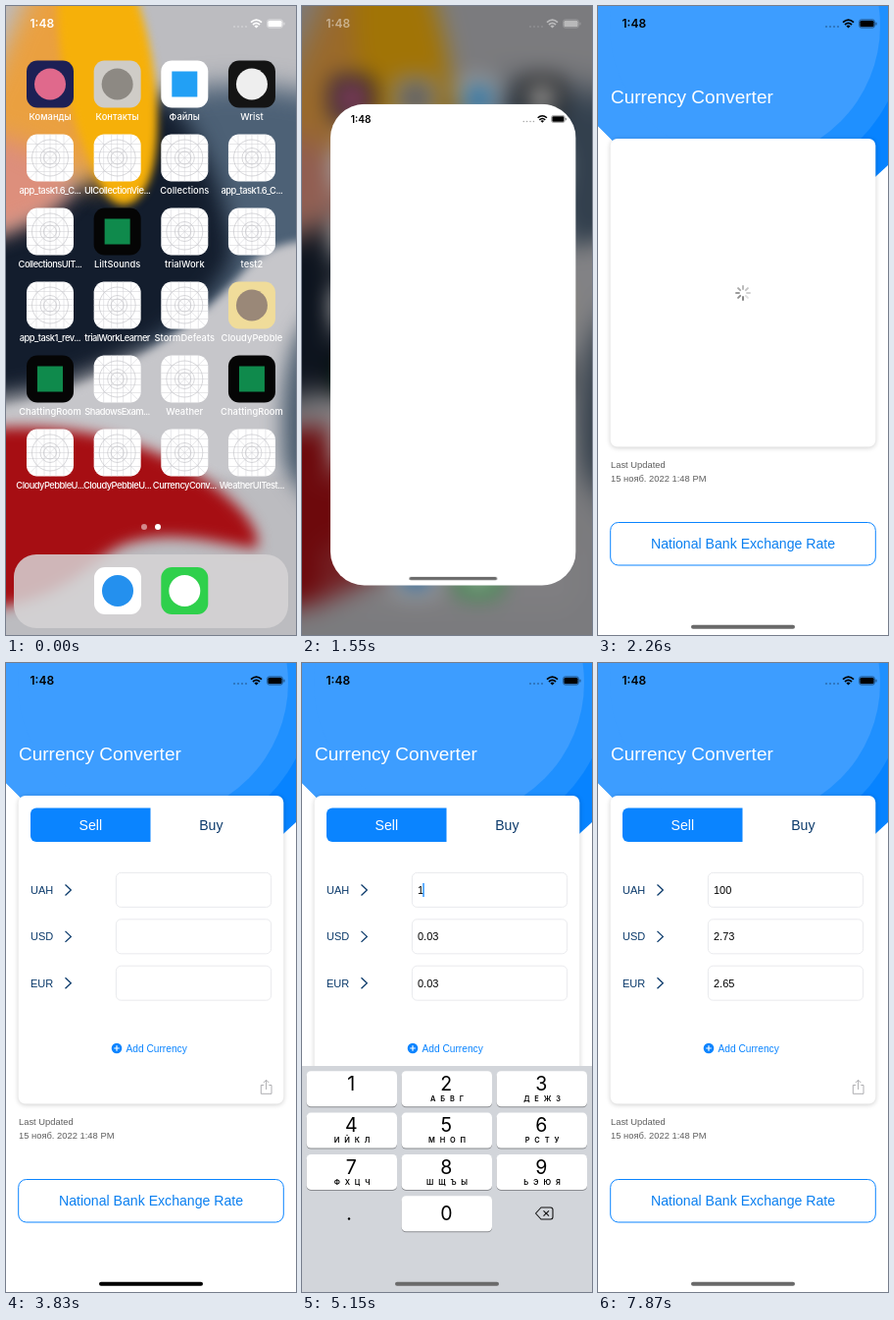
Recreate the animation shown at these times as an HTML page. Size 296 by 640 pixels, loop 8000 ms.

```html
<!DOCTYPE html>
<html lang="en">
<head>
<meta charset="utf-8">
<title>Currency Converter</title>
<style>
  html, body { margin: 0; width: 100%; height: 100%; overflow: hidden; background: #000; }
  svg { display: block; width: 296px; height: 640px; }
  text { font-family: "Liberation Sans", Arial, sans-serif; white-space: pre; }
  .sf { font-family: Inter, sans-serif; }
  .mid { text-anchor: middle; }
</style>
</head>
<body>
<svg id="stage" viewBox="0 0 296 640"></svg>
<script>
const BLUE = '#0a84ff', NAVY = '#0b3a6b';
const $ = id => document.getElementById(id);
const rect = (x, y, w, h, r, fill, more = '') =>
  `<rect x="${x}" y="${y}" width="${w}" height="${h}" rx="${r}" fill="${fill}" ${more}/>`;
const circle = (x, y, r, fill, more = '') => `<circle cx="${x}" cy="${y}" r="${r}" fill="${fill}" ${more}/>`;
const line = (d, color, width, more = '') =>
  `<path d="${d}" fill="none" stroke="${color}" stroke-width="${width}" ${more}/>`;
const text = (x, y, size, fill, str, more = '') =>
  `<text x="${x}" y="${y}" font-size="${size}" fill="${fill}" ${more}>${str}</text>`;
const blob = (d, fill, blur) => `<path d="${d}" fill="${fill}" style="filter:blur(${blur}px)"/>`;

// ---- shared status bar ----
const statusBar = color =>
  text(24.5, 22.4, 12, color, '1:48', 'class="sf" font-weight="600"') +
  [233, 237, 241, 245].map(x => circle(x, 21, .9, color, 'opacity=".35"')).join('') +
  line('M250 16.6Q255.5 11.6 261 16.6M252 19Q255.5 15.8 259 19', color, 1.8) +
  `<path d="M255.5 22.6L253.4 20.4Q255.5 18.8 257.6 20.4Z" fill="${color}"/>` +
  rect(266.5, 13.8, 16, 8.4, 2.4, 'none', `stroke="${color}" stroke-width=".8" opacity=".5"`) +
  rect(267.4, 14.7, 14.2, 6.6, 1.5, color) +
  rect(283.4, 16.6, 1.1, 3, .5, color, 'opacity=".5"');

// ---- home screen ----
const wallpaper =
  rect(-40, -40, 376, 720, 0, '#bcbcc0') +
  blob('M340 95C250 75 180 70 140 110L60 330 200 360 340 290Z', '#4d6176', 13) +
  blob('M-40 240C40 215 110 160 150 90C190 100 225 190 232 250C225 300 100 400-40 400Z', '#131d2d', 11) +
  blob('M-40 415C100 400 195 325 248 264C268 243 290 238 340 236V470L240 480-40 450Z', '#c6c6ca', 4) +
  blob('M340 300C290 310 276 380 284 470L340 540Z', '#4a5c6e', 10) +
  blob('M-40 110C30 100 80 130 70 180C50 220 10 225-40 240Z', '#dd8f7c', 11) +
  blob('M35-40L-40 130C20 125 60 170 100 190V-40Z', '#eaa040', 12) +
  blob('M55-40H120C150 20 162 110 150 165C140 205 115 215 97 185C70 130 45 50 55-40Z', '#f6b009', 4) +
  blob('M-40 432C60 420 140 440 200 480C235 503 262 532 256 552C220 548 170 530 120 548C90 560 60 610-40 616Z', '#a60e13', 7);

const gridIcon = rect(0, 0, 48, 48, 11, '#fff') +
  line('M10 0V48M18 0V48M24 0V48M30 0V48M38 0V48M0 10H48M0 18H48M0 24H48M0 30H48M0 38H48M3 3L45 45M45 3L3 45', '#cfcfd3', .5) +
  [6.5, 10, 18.5].map(r => circle(24, 24, r, 'none', 'stroke="#bdbdc2" stroke-width=".6"')).join('');

const apps = ('Команды|Контакты|Файлы|Wrist|app_task1.6_C...|UICollectionVie...|Collections|app_task1.6_C...|' +
  'CollectionsUIT...|LiltSounds|trialWork|test2|app_task1_rev...|trialWorkLearner|StormDefeats|CloudyPebble|' +
  'ChattingRoom|ShadowsExam...|Weather|ChattingRoom|CloudyPebbleU...|CloudyPebbleU...|CurrencyConv...|WeatherUITest...').split('|');
const green = ['#050505', '#0f8a4c', 'square'];
const tiles = {
  0: ['#1d2055', '#e0698c'], 1: ['#cfccc7', '#8d8983'], 2: ['#fff', '#22a0f5', 'square'], 3: ['#141414', '#eee'],
  9: green, 15: ['#f0dc9a', '#9a8878'], 16: green, 19: green,
};
const tile = (x, y, [back, mark, shape]) => rect(x, y, 48, 48, 11, back) +
  (shape ? rect(x + 11, y + 11, 26, 26, 0, mark) : circle(x + 24, y + 24, 16, mark));

const appIcon = (name, i) => {
  const cx = 45 + i % 4 * 68.65, y = 55.5 + (i >> 2) * 75;
  return (tiles[i] ? tile(cx - 24, y, tiles[i]) : `<use href="#grid" x="${cx - 24}" y="${y}"/>`) +
    text(cx, y + 60.5, 9.3, '#fff', name,
      `class="sf mid" font-weight="500" letter-spacing="${name.length > 13 ? -.5 : .05}"`);
};
const icons = apps.map(appIcon).join('') +
  rect(158.3, 430.5, 48, 48, 11, '#000', 'id="press" opacity=".4"') +
  circle(141, 530, 3, '#ffffff80') + circle(155, 530, 3, '#fff') +
  rect(8, 558, 280, 75, 23, '#d6d4d5', 'id="dock"') +
  tile(90, 571, ['#fff', '#2490ee']) + tile(158.3, 571, ['#2fd04c', '#fff']);

// ---- converter ----
const header =
  `<clipPath id="banner"><path d="M0 0H296V162L200 250H128L0 122Z"/></clipPath><g clip-path="url(#banner)">` +
  rect(0, 0, 296, 260, 0, '#0783ff') + circle(150, 20, 165, '#1f90ff') +
  rect(0, 0, 150, 260, 0, '#3d9dff') + circle(150, 20, 138, '#3d9dff') + '</g>' +
  text(13, 98.8, 19, '#fff', 'Currency Converter');

const spokes = Array.from({ length: 8 }, (_, i) =>
  line('M148 296V299', '#555', 1.9, `stroke-linecap="round" opacity="${.75 - i * .08}" transform="rotate(${i * 45} 148 292)"`)).join('');

const currencyRow = (code, i) => {
  const y = 231 + i * 47.4;
  return text(25, y + 4, 11, NAVY, code) +
    line(`M60.5 ${y - 5.5}L66.3 ${y}L60.5 ${y + 5.5}`, NAVY, 1.3) +
    rect(112.4, y - 17.6, 158.2, 35, 5, '#fff', 'stroke="#e4e5e9" stroke-width=".8"') +
    text(118, y + 4, 11, '#000', '', `id="${code}"`);
};
const form =
  `<path d="M147.5 147.5H31a6 6 0 0 0-6 6V176a6 6 0 0 0 6 6H147.5Z" fill="${BLUE}"/>` +
  text(86.3, 170, 14.1, '#fff', 'Sell', 'class="mid"') + text(209.3, 170, 14.1, NAVY, 'Buy', 'class="mid"') +
  ['UAH', 'USD', 'EUR'].map(currencyRow).join('') +
  rect(118, 224, 1.3, 14, 0, BLUE, 'id="cursor"') +
  circle(113, 392, 5.3, BLUE) + line('M110.2 392H115.8M113 389.2V394.8', '#fff', 1.2) +
  text(122.5, 395.6, 10.2, BLUE, 'Add Currency') +
  line('M263 429.5H260.3V438.3H271V429.5H268.3M265.6 434V424.5M262.9 427L265.6 424.3L268.3 427', '#a5a5aa', .9);

const footer =
  text(13, 470, 9.4, '#5e5e5e', 'Last Updated') + text(13, 484, 9.4, '#5e5e5e', '15 нояб. 2022 1:48 PM') +
  rect(12.7, 525.5, 270.6, 43.5, 8, '#fff', `stroke="${BLUE}"`) +
  text(148, 552, 14.1, '#0a7ff0', 'National Bank Exchange Rate', 'class="mid"');

const letters = ['', 'АБВГ', 'ДЕЖЗ', 'ИЙКЛ', 'МНОП', 'РСТУ', 'ФХЦЧ', 'ШЩЪЫ', 'ЬЭЮЯ'];
const key = (digit, col, row) => {
  const x = 4.6 + col * 97, y = 415.3 + row * 42.3, cx = x + 46.2;
  return rect(x, y + 1, 92.4, 36, 4.5, '#8b8d91') + rect(x, y, 92.4, 36, 4.5, '#fff', `id="key${digit}"`) +
    text(cx - .5, digit ? y + 19.7 : y + 24.8, 19.5, '#000', digit, 'class="sf mid"') +
    text(cx + 1, y + 30.6, 7.4, '#000', digit ? letters[digit - 1].split('').join(' ') : '',
      'class="sf mid" font-weight="600" letter-spacing="1.5"');
};
const keyboard = rect(0, 410, 296, 260, 0, '#d2d5da') +
  letters.map((_, i) => key(i + 1, i % 3, i / 3 | 0)).join('') + key(0, 1, 3) +
  circle(48, 565.5, 1.2, '#000') +
  line('M244 554H253.5Q256 554 256 556.5V563.5Q256 566 253.5 566H244L238.5 560ZM246.5 557.3L252 562.7M252 557.3L246.5 562.7',
    '#111', 1.1, 'stroke-linejoin="round"');

$('stage').innerHTML =
  `<defs><g id="grid">${gridIcon}</g><clipPath id="window">${rect(0, 0, 296, 640, 0, '#000', 'id="frame"')}</clipPath></defs>` +
  `<g id="home"><g id="blurred">${wallpaper}<g id="icons">${icons}</g></g>` +
  rect(0, 0, 296, 640, 0, '#000', 'id="shade"') + `<g id="homeStatus">${statusBar('#fff')}</g></g>` +
  `<g id="app" clip-path="url(#window)"><g id="content">${rect(0, 0, 296, 700, 0, '#fff')}` +
  `<g id="page">${header}` +
  rect(12.7, 135, 270.6, 313.5, 7, '#fff', 'style="filter:drop-shadow(0 1.5px 2.5px #0003)"') +
  `<g id="spinner">${spokes}</g><g id="form">${form}</g>${footer}<g id="keyboard">${keyboard}</g></g>` +
  statusBar('#000') + rect(95, 629.8, 106, 4, 2, '#000', 'id="bar"') + '</g></g>';

// ---- motion ----
const set = (id, attrs) => { for (const k in attrs) $(id).setAttribute(k, attrs[k]); };
const show = (id, on) => { $(id).style.display = on ? '' : 'none'; };
const clamp = v => Math.min(1, Math.max(0, v));
const during = (t, a, b) => t >= a && t < b;
const spring = (ms, rate) => {
  const x = Math.max(0, ms) / 1000 * rate, v = 1 - (1 + x) * Math.exp(-x);
  return v > .994 ? 1 : v;
};
// Value of the last [time, value] step already reached.
const step = (t, steps) => steps.filter(s => s[0] <= t).pop()[1];

function render(t) {
  // The app window grows out of its icon; the height lags behind the width.
  const open = spring(t - 1370, 17.2);
  const w = 48 + 248 * open, h = 48 + 592 * open ** 1.45, scale = w / 296;
  const x = 182.3 - 34.3 * open - w / 2, y = 454.5 - 134.5 * open - h / 2;
  show('home', open < 1);
  show('app', open > 0);
  show('press', during(t, 1210, 1400));
  set('frame', { x, y, width: w, height: h, rx: open === 1 ? 0 : 11 + 29 * open });
  set('content', { transform: `translate(${x} ${y}) scale(${scale})` });
  set('app', { opacity: clamp((t - 1370) / 90) });
  $('blurred').style.filter = open ? `blur(${13 * open}px)` : 'none';
  set('icons', { transform: `translate(148 320) scale(${1 - .075 * open}) translate(-148 -320)` });
  set('dock', { opacity: .85 * (1 - open) });
  set('shade', { opacity: .42 * open });
  set('homeStatus', { opacity: 1 - .65 * open });
  set('bar', { transform: `translate(0 ${h / scale - 640})`, fill: during(t, 3830, 4820) ? '#000' : '#6a6a6a' });

  set('page', { opacity: clamp((t - 2020) / 240) });
  show('spinner', t < 3830);
  show('form', t >= 3830);

  const lift = spring(t - 4000, 15) - spring(t - 7290, 15);
  set('keyboard', { transform: `translate(0 ${232 * (1 - lift)})` });
  set('key1', { fill: during(t, 4820, 5150) ? '#b4b8c0' : '#fff' });
  set('key0', { fill: during(t, 5430, 5660) || during(t, 5780, 6030) ? '#b4b8c0' : '#fff' });

  const amount = step(t, [[0, ''], [4930, '1'], [5550, '10'], [6030, '100']]);
  $('UAH').textContent = amount;
  $('USD').textContent = amount && (amount * .0273).toFixed(2);
  $('EUR').textContent = amount && (amount * .0265).toFixed(2);
  set('cursor', {
    x: 117 + amount.length * 6.35,
    opacity: step(t, [[0, 0], [4010, 1], [6300, .5], [6420, 0], [6660, .3], [6770, .55], [7310, 0]]),
  });
}

function loop() {
  render(performance.now() % 8000);
  requestAnimationFrame(loop);
}
loop();
</script>
</body>
</html>
```
